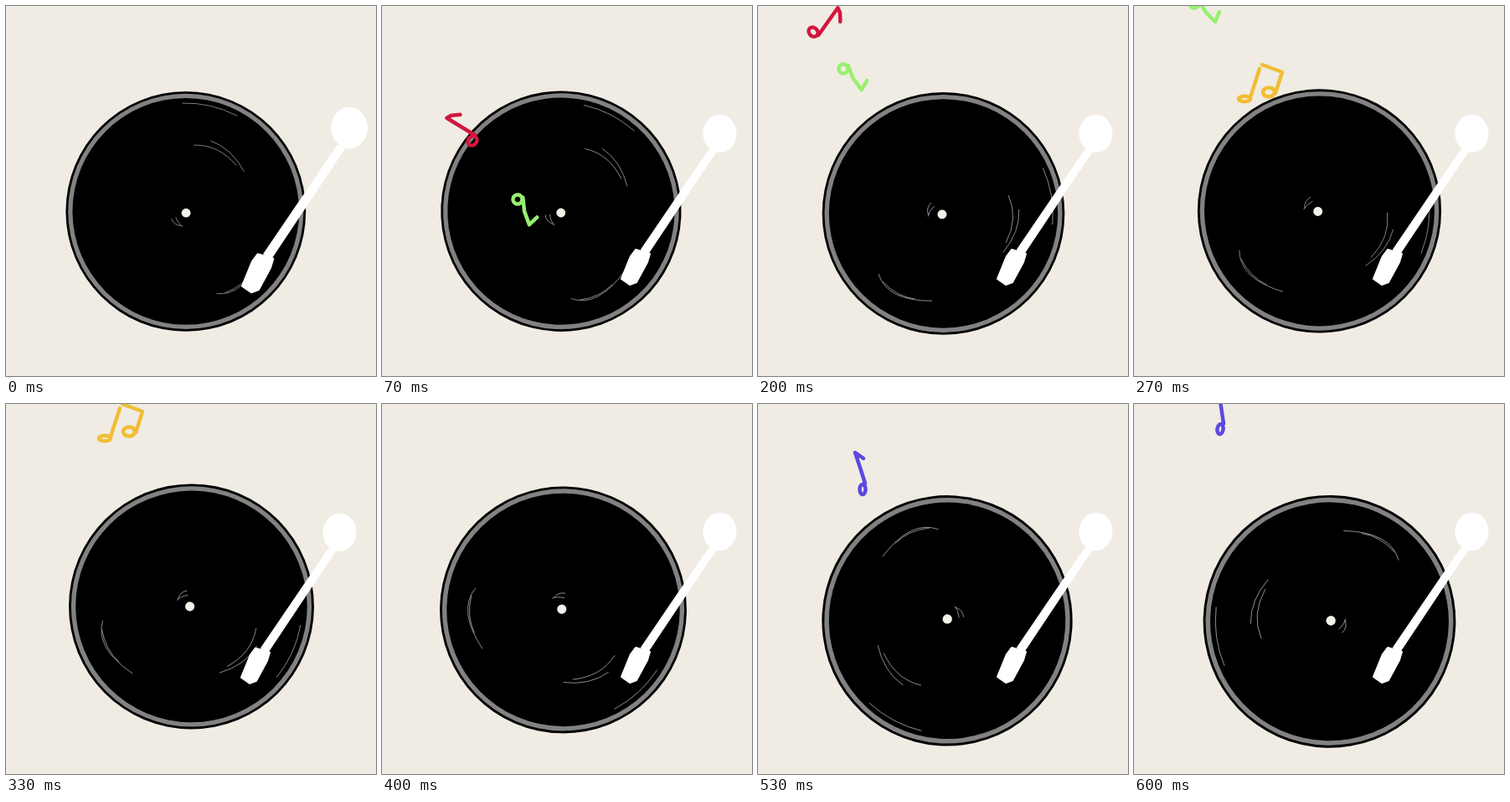
Recreate the animation shown at these times as an HTML page. Size 442 px wide and 442 px high, loop 0.67 s.

```html
<!DOCTYPE html>
<html lang="en">
<head>
<meta charset="utf-8">
<title>Turntable</title>
<style>
  html, body { margin: 0; width: 100%; height: 100%; overflow: hidden; background: #f0ece4; }
  svg { display: block; width: 100vw; height: 100vh; }
  .scratch { fill: none; stroke: #999; stroke-width: .8; stroke-linecap: round; }
  #notes { fill: none; stroke-width: 4.5; stroke-linecap: round; stroke-linejoin: round; }
  #arm { fill: #fff; stroke: #fff; stroke-width: 2; stroke-linejoin: round; }
</style>
</head>
<body>
<svg viewBox="0 0 442 442">
  <g id="disc">
    <circle r="143"/>
    <circle r="140.2" fill="#828282"/>
    <circle r="135"/>
    <g class="scratch">
      <path d="M-4-129Q30-130 61-114"/>
      <path d="M10-79Q39-80 60-55M30-84Q55-75 69-48"/>
      <path d="M-17 9Q-14 17-5 17M-12 7Q-9 15-4 18"/>
      <path d="M37 98Q70 101 90 52M47 97Q70 88 80 70"/>
    </g>
    <circle cx=".3" cy="1.8" r="5.4" fill="#f4f1ea"/>
  </g>
  <g id="notes"></g>
  <g id="arm">
    <ellipse cx="403.5" cy="152.5" rx="19" ry="21.7"/>
    <path d="M391 172L398 175 318 295 310 291Z"/>
    <path d="M303 291L320 296 317 306 304 330 296 333 286 326 297 299Z"/>
  </g>
</svg>
<script>
const LOOP = 670, STEPS = 10;

// wobble of the record: step, centre x, centre y, turn in degrees
const wobble = [
  [0, 214.8, 245.4, 0], [2, 213, 245, 28], [3, 221.5, 247.9, 67.5], [5, 221.5, 241.9, 101.5],
  [6, 216.5, 245.9, 124.5], [8, 226, 258.8, 195], [9, 233.5, 259.8, 249]
];

const head = (rx, ry, x = 0, y = 0) =>
  `M${x - rx} ${y}a${rx} ${ry} 0 1 0 ${2 * rx} 0a${rx} ${ry} 0 1 0 ${-2 * rx} 0`;

// each note leaves the record at its birth step, then drifts and spins evenly
const notes = [
  { color: '#d3163f', d: head(6, 5) + 'M13-32L5-39-1-41 7-2',
    born: 1, x: 108, y: 161, dx: -21, dy: -65, spin: 47 },
  { color: '#98f06e', d: head(5.5, 5.5) + 'M6-3L10 13 18 28 26 18',
    born: 1, x: 162, y: 231, dx: -30, dy: -78, spin: -8 },
  { color: '#f2bd35', d: head(7, 3.2) + head(7, 5.5, 29, -8) + 'M7-2L18-36M21-41L45-32 37-7',
    born: 4, x: 132, y: 111, dx: -14, dy: -70, spin: 0 },
  { color: '#5c48e0', d: head(3.5, 6) + 'M1-37L-9-44-3-26 3-7',
    born: 7, x: 147, y: 174, dx: -22, dy: -72, spin: 9 }
];

// the arm swings in on the first step and gives one small hop later
const armPose = {
  0: 'translate(355.5 232.4) scale(1.09) translate(-353.3 -232.3)',
  5: 'translate(-5 .7)'
};

const el = id => document.getElementById(id);
const startOf = step => Math.round(step * 20 / 3) * 10;

function wobbleAt(step) {
  const next = Math.max(1, wobble.findIndex(key => key[0] >= step));
  const a = wobble[next - 1], b = wobble[next];
  const p = (step - a[0]) / (b[0] - a[0]);
  return a.map((v, i) => v + (b[i] - v) * p);
}

for (const note of notes) {
  note.path = document.createElementNS('http://www.w3.org/2000/svg', 'path');
  note.path.setAttribute('d', note.d);
  note.path.setAttribute('stroke', note.color);
  el('notes').append(note.path);
}

function draw(step) {
  const [, x, y, turn] = wobbleAt(step);
  const r = 143.4 + 7.5 * (step / 9) ** 1.5;
  el('disc').setAttribute('transform', `translate(${x} ${y}) rotate(${turn}) scale(${r / 143})`);

  for (const { path, born, x, y, dx, dy, spin } of notes) {
    const age = step - born;
    path.setAttribute('visibility', age < 0 ? 'hidden' : 'visible');
    path.setAttribute('transform',
      `translate(${x + dx * age} ${y + dy * age}) rotate(${spin * (age - 1)})`);
  }
  el('arm').setAttribute('transform', armPose[step] || '');
}

const begin = performance.now();

function tick() {
  const t = (performance.now() - begin) % LOOP;
  let step = STEPS - 1;
  while (startOf(step) > t) step--;
  draw(step);
  requestAnimationFrame(tick);
}
tick();
</script>
</body>
</html>
```
